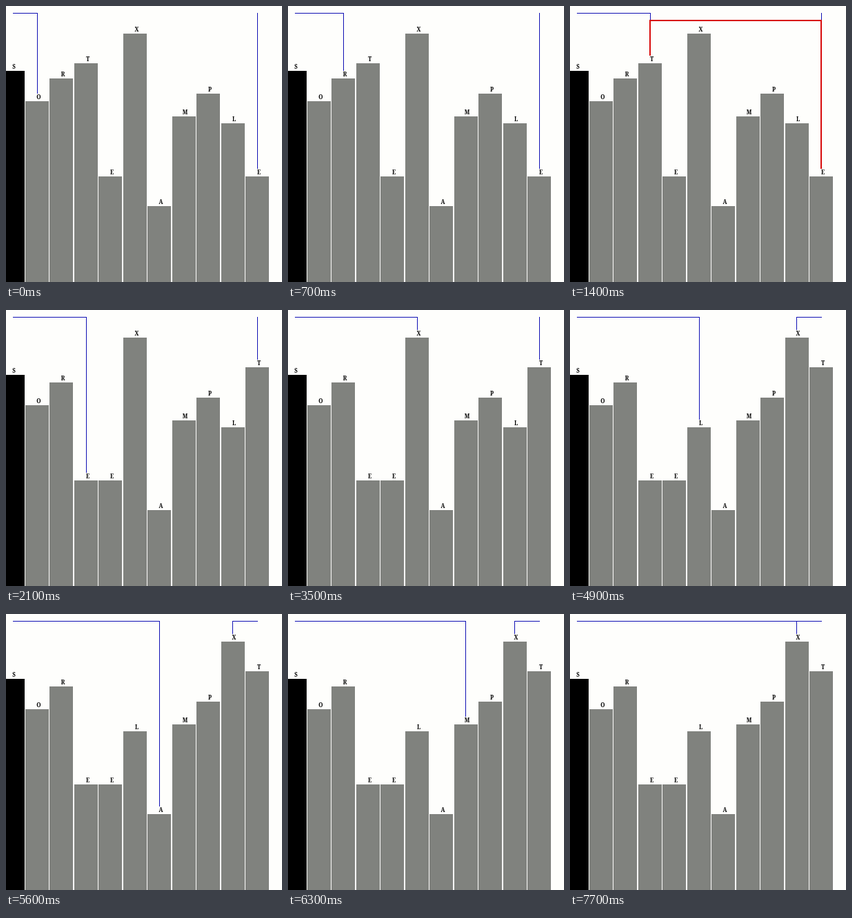
These frames come from a looping animation (400x400 px, 8000 ms). An HTML page:

```html
<!DOCTYPE html>
<html lang="en">
<head>
<meta charset="utf-8">
<title>Partition trace</title>
<style>
  html, body { margin: 0; width: 100%; height: 100%; overflow: hidden; background: #fefefc; }
  svg { display: block; width: 100vw; height: 100vh; }
  rect { fill: #80827e; shape-rendering: crispEdges; }
  rect.pivot { fill: #000; }
  path { fill: none; shape-rendering: crispEdges; }
  #scan { stroke: #1010b4; stroke-width: 1; }
  #swap { stroke: #d80c0c; stroke-width: 2; }
  text { font: bold 8px "Noto Serif", "Liberation Serif", serif; text-anchor: middle; }
</style>
</head>
<body>
<svg viewBox="0 0 400 400">
  <g id="bars"></g>
  <path id="scan"/>
  <path id="swap"/>
</svg>
<script>
const STEP = 700, LOOP = 8000, PITCH = 35.45;
const $ = id => document.getElementById(id);

// Letters in order, left pointer, right pointer, whether a swap is marked
const START = "SORTEXAMPLE", ONCE = "SOREEXAMPLT", TWICE = "SOREELAMPXT";
const steps = [
  [START, 1, 10], [START, 2, 10], [START, 3, 10, true],
  [ONCE, 3, 10], [ONCE, 4, 10], [ONCE, 5, 10], [ONCE, 5, 9, true],
  [TWICE, 5, 9], [TWICE, 6, 9], [TWICE, 7, 9], [TWICE, 8, 9], [TWICE, 9, 9]
];

const topOf = c => Math.round(301 - 10.88 * (c.charCodeAt(0) - 64));
const lineX = k => Math.floor(9.75 + PITCH * k);

function add(tag, attrs) {
  const el = document.createElementNS("http://www.w3.org/2000/svg", tag);
  for (const name in attrs) el.setAttribute(name, attrs[name]);
  return $("bars").appendChild(el);
}

const bars = [...START].map((c, k) => ({
  rect: add("rect", k
    ? { x: Math.round(27.8 + 35.5 * (k - 1)), width: 34 }
    : { x: 0, width: 27, class: "pivot" }),
  label: add("text", { x: lineX(k) + 2.5 })
}));

function draw([letters, i, j, swapping]) {
  bars.forEach(({ rect, label }, k) => {
    const y = topOf(letters[k]);
    rect.setAttribute("y", y);
    rect.setAttribute("height", 400 - y);
    label.setAttribute("y", y - 3);
    label.textContent = letters[k];
  });
  const xi = lineX(i), xj = lineX(j);
  const yi = topOf(letters[i]) - 11, yj = topOf(letters[j]) - 11;
  $("scan").setAttribute("d",
    `M10 10.5H${xi + .5}V${yi}M${lineX(10) + 1} 10.5H${xj + .5}V${yj}`);
  $("swap").setAttribute("d", swapping ? `M${xi} ${yi}V21H${xj}V${yj}` : "");
}

let shown = -1;
function tick() {
  const n = Math.floor(performance.now() % LOOP / STEP);
  if (n !== shown) draw(steps[shown = n]);
  requestAnimationFrame(tick);
}
tick();
</script>
</body>
</html>
```
